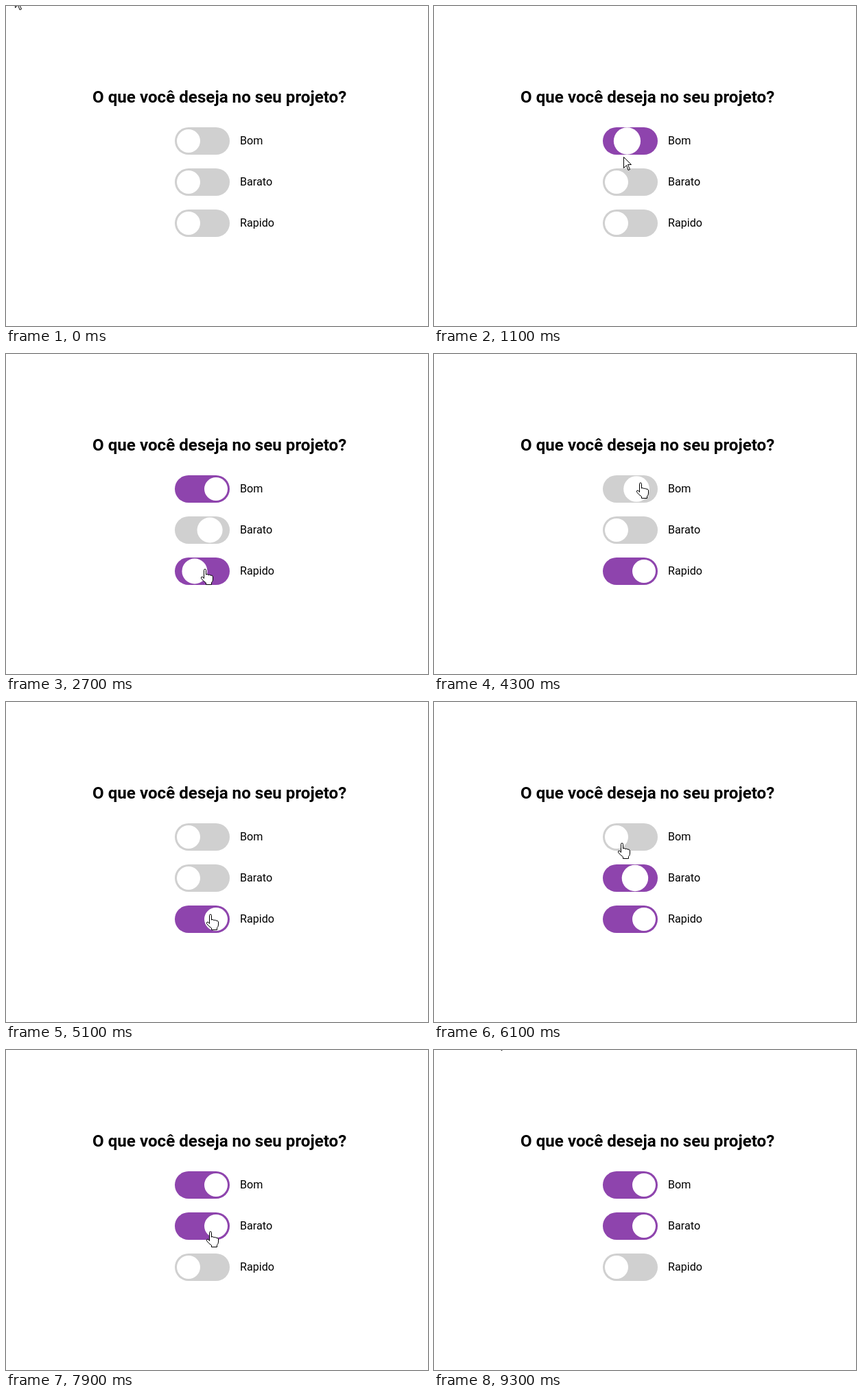
These frames come from a looping animation (615 by 467 pixels, 9.5 s). An HTML page:

```html
<!DOCTYPE html>
<html lang="pt">
<head>
<meta charset="utf-8">
<title>O que você deseja no seu projeto?</title>
<style>
  html, body { margin: 0; width: 100%; height: 100%; overflow: hidden; background: #fff; }
  svg { display: block; width: 100%; height: 100%; }
  text { font: 16.15px Roboto, sans-serif; }
  .title { font-size: 24.15px; font-weight: 700; }
  .cursor { fill: #fff; stroke: #000; stroke-linejoin: round; }
</style>
</head>
<body>
<svg viewBox="0 0 615 467">
  <text class="title" x="126" y="141">O que você deseja no seu projeto?</text>
  <g id="switches"></g>
  <path id="arrow" class="cursor" d="M.5.5V16.5L4.5 12.5 7 19.5 9.5 18.5 6.5 11.5H11.5Z"/>
  <path id="hand" class="cursor" d="M-1.5 14.5V2.5a1.5 1.5 0 0 1 3 0V9q1.5-1.5 3.5.5 1.5-1 3 .5 3-.5 3.5 2V16q0 3-2 4.5v3h-8v-2.5Q-3 18-5.5 14.5q-.5-2.5 1.5-2.5 1 .2 2.5 2.5Z"/>
</svg>
<script>
const LOOP = 9500, STEP = 100, SLIDE = 300, MOVE = 350;
const LEFT = 246, WIDTH = 80, HEIGHT = 40;
const $ = id => document.getElementById(id);

// Every time in flips (ms) reverses the state of that switch.
const switches = [
  { name: 'Bom', flips: [984, 4218, 6783] },
  { name: 'Barato', flips: [1780, 2633, 5898] },
  { name: 'Rapido', flips: [2633, 6783] },
];

// The pointer sets off at each time (ms) for the given place, then rests there.
const pointerStart = { x: 13, y: -14 };
const pointerMoves = [
  { at: 0, x: 344, y: 190 },
  { at: 300, x: 275, y: 213 },
  { at: 1000, x: 278, y: 250 },
  { at: 1750, x: 290, y: 313 },
  { at: 2900, x: 304, y: 225 },
  { at: 3450, x: 301, y: 187 },
  { at: 4450, x: 298, y: 309 },
  { at: 5150, x: 272, y: 187 },
  { at: 5500, x: 272, y: 267 },
  { at: 5870, x: 275, y: 182 },
  { at: 6895, x: 412, y: 387 },
  { at: 7245, x: 243, y: 290 },
  { at: 7550, x: 298, y: 264 },
  { at: 8400, x: 91, y: -19 },
];

const smooth = k => k * k * (3 - 2 * k);
const mix = (a, b, k) => Math.round(a + (b - a) * k);

function add(tag, attributes) {
  const node = document.createElementNS('http://www.w3.org/2000/svg', tag);
  for (const key in attributes) node.setAttribute(key, attributes[key]);
  return $('switches').appendChild(node);
}

switches.forEach((item, i) => {
  item.y = 177 + 60 * i;
  item.pill = add('rect', { x: LEFT, y: item.y, width: WIDTH, height: HEIGHT, rx: 20 });
  item.ball = add('circle', { cy: item.y + 20, fill: '#fff' });
  add('text', { x: 341, y: item.y + 25 }).textContent = item.name;
});

function drawSwitch(item, time) {
  const past = item.flips.filter(flip => flip <= time);
  const on = past.length % 2 === 1;
  const progress = past.length ? Math.min(1, (time - past.at(-1)) / SLIDE) : 1;
  const scale = 1 + 0.2 * (1 - Math.abs(2 * progress - 1));
  item.pill.setAttribute('fill', on ? '#8e44ad' : '#d0d0d0');
  item.ball.setAttribute('cx', LEFT + 20 + 40 * (on ? progress : 1 - progress));
  item.ball.setAttribute('r', 17 * scale);
}

function pointerAt(time) {
  const i = pointerMoves.findLastIndex(move => move.at <= time);
  const from = pointerMoves[i - 1] ?? pointerStart;
  const to = pointerMoves[i];
  const duration = Math.min(MOVE, (pointerMoves[i + 1]?.at ?? LOOP) - to.at);
  const k = smooth(Math.min(1, (time - to.at) / duration));
  return { x: mix(from.x, to.x, k), y: mix(from.y, to.y, k) };
}

function drawPointer(time) {
  const { x, y } = pointerAt(time);
  const hovering = x >= LEFT && x < LEFT + WIDTH &&
    switches.some(item => y >= item.y && y < item.y + HEIGHT);
  for (const id of ['arrow', 'hand']) {
    $(id).setAttribute('transform', `translate(${x} ${y})`);
    $(id).style.display = (id === 'hand') === hovering ? '' : 'none';
  }
}

const start = performance.now();
function draw() {
  const elapsed = (performance.now() - start) % LOOP;
  const time = Math.floor(elapsed / STEP) * STEP;
  switches.forEach(item => drawSwitch(item, time));
  drawPointer(time);
  requestAnimationFrame(draw);
}
draw();
</script>
</body>
</html>
```
